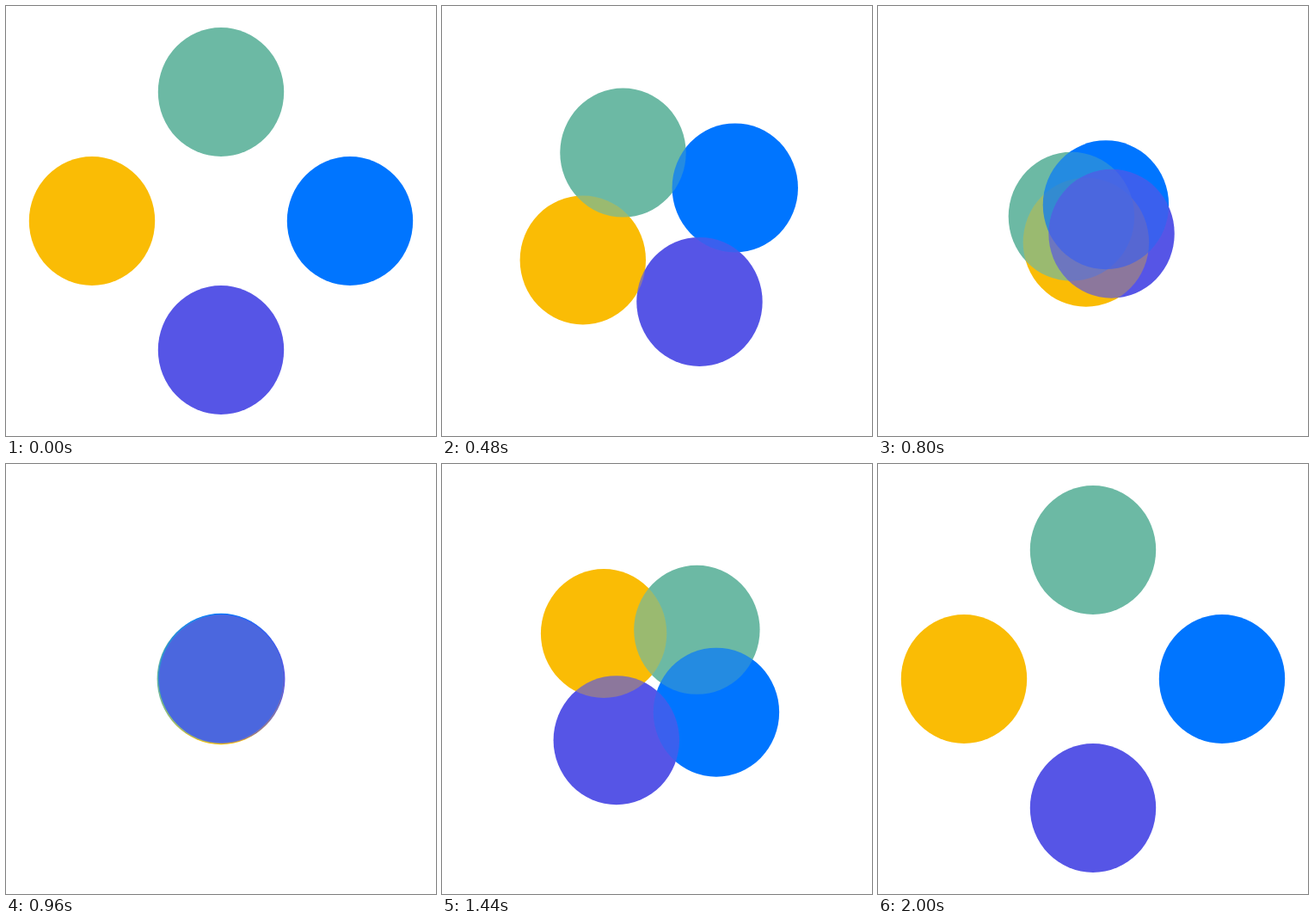
An HTML page with a canvas for the animation above (2.04 s loop, 500 by 500 pixels).

```html
<!DOCTYPE html>
<html lang="en">
<head>
<meta charset="utf-8">
<title>Four circles</title>
<style>
  html, body { margin: 0; width: 100%; height: 100%; overflow: hidden; background: #fff; }
  canvas { display: block; width: 500px; height: 500px; }
</style>
</head>
<body>
<canvas width="500" height="500"></canvas>
<script>
const ctx = document.querySelector('canvas').getContext('2d');
const LOOP = 2040, TICK = 40, MEET = 23, LAST = 45, ORBIT = 150;

// From the rim [ring] to the centre: handle lengths at each end, all sideways to the radius.
function makePath(dx, dy, side, rimPull, centrePull) {
  const sx = dy * side, sy = -dx * side;
  const x = dx * ORBIT, y = dy * ORBIT;
  const path = document.createElementNS('http://www.w3.org/2000/svg', 'path');
  path.setAttribute('d', `M${x} ${y}C${x + sx * rimPull} ${y + sy * rimPull} ` +
    `${sx * centrePull} ${sy * centrePull} 0 0`);
  const length = path.getTotalLength();
  return share => path.getPointAtLength(length * share);
}

function makeCircle(color, dx, dy, inPulls, outPulls) {
  return { color, goIn: makePath(dx, dy, 1, ...inPulls), goOut: makePath(dx, dy, -1, ...outPulls) };
}

// Bottom to top
const circles = [
  makeCircle('#fabc05', -1, 0, [53.6, 70.6], [57.4, 82.8]),
  makeCircle('#6cb9a4', 0, -1, [15.7, 92.9], [17.6, 96.7]),
  makeCircle('#0075ff', 1, 0, [67, 33.3], [68.8, 36.3]),
  makeCircle('#5655e6', 0, 1, [91.1, 35.2], [93.9, 34.2])
];

// cubic-bezier(x1, 0, x2, 1)
function ease(x, x1, x2) {
  let low = 0, high = 1;
  for (let i = 0; i < 30; i++) {
    const t = (low + high) / 2, r = 1 - t;
    if (3 * r * r * t * x1 + 3 * r * t * t * x2 + t * t * t < x) low = t;
    else high = t;
  }
  return low * low * (3 - 2 * low);
}

// Every twelfth tick holds the previous pose.
function poseAt(ms) {
  const tick = Math.floor(ms % LOOP / TICK);
  return tick - Math.floor((tick + 11) / 12);
}

function fillCircle(p, mode, alpha) {
  ctx.globalCompositeOperation = mode;
  ctx.globalAlpha = alpha;
  ctx.beginPath();
  ctx.ellipse(250 + p.x, 250 + p.y, 73.2, 75, 0, 0, 2 * Math.PI);
  ctx.fill();
}

function draw(pose) {
  const inward = pose < MEET;
  const share = inward
    ? ease(pose / MEET, 0.37, 0.69)
    : 1 - ease((pose - MEET) / (LAST - MEET), 0.25, 0.73);
  ctx.clearRect(0, 0, 500, 500);
  for (const c of circles) {
    const p = (inward ? c.goIn : c.goOut)(share);
    ctx.fillStyle = c.color;
    // Translucent over other circles, solid on the empty ground
    fillCircle(p, 'source-atop', 0.67);
    fillCircle(p, 'destination-over', 1);
  }
}

const start = performance.now();
function frame() {
  draw(poseAt(performance.now() - start));
  requestAnimationFrame(frame);
}
frame();
</script>
</body>
</html>
```
